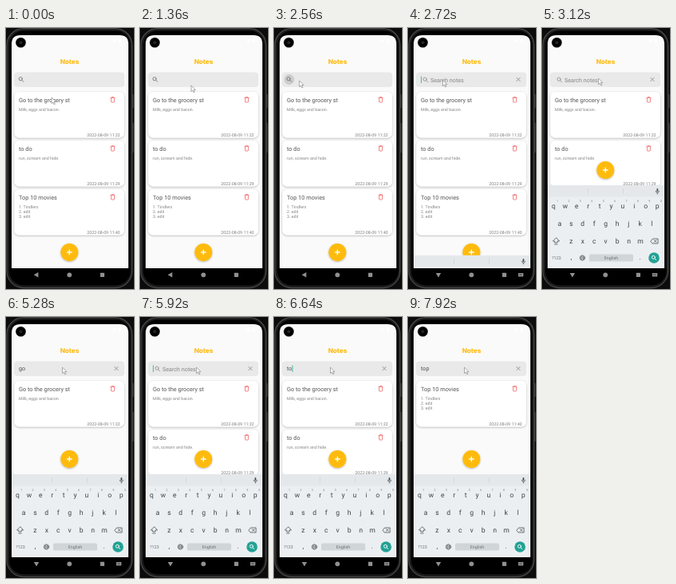
An HTML page for the animation above (8 s loop, 160x327 px).

```html
<!DOCTYPE html>
<html lang="en">
<head>
<meta charset="utf-8">
<title>Notes search</title>
<style>
html, body { margin: 0; width: 100%; height: 100%; overflow: hidden; background: #000; }
svg { display: block; width: 160px; height: 327px; }
text { font-family: Roboto, "Noto Sans", sans-serif; text-rendering: geometricPrecision; }
.brand { font: 800 8.1px Inter, sans-serif; fill: #ffbb12; text-anchor: middle; }
.title { font-size: 7.35px; fill: #555; }
.body { font-size: 5.3px; fill: #858585; }
.date { font-size: 5.3px; fill: #7c7c7c; text-anchor: end; }
.hint { font-size: 7.2px; fill: #858585; }
.query { font-size: 7.2px; fill: #505050; }
.key { font-size: 8.6px; fill: #3c4347; text-anchor: middle; }
.small { font-size: 5.4px; fill: #697176; text-anchor: middle; }
.num { font-size: 3.7px; fill: #737b80; text-anchor: middle; }
.line { fill: none; stroke-linecap: round; stroke-linejoin: round; }
</style>
</head>
<body>
<svg viewBox="0 0 160 327">
  <defs>
    <clipPath id="screen"><path d="M7 301V20Q7 9 18 9H142Q153 9 153 20V301Z"/></clipPath>
    <filter id="soft" x="-20%" y="-20%" width="140%" height="150%">
      <feDropShadow dx="0" dy=".8" stdDeviation=".9" flood-color="#000" flood-opacity=".32"/>
    </filter>
    <g id="trash" class="line" stroke="#f06464" stroke-width=".8">
      <path d="M130.9 7.3H135.9M132.5 6.5H134.3M131.4 7.6V12.4Q131.4 13 132 13H134.8Q135.4 13 135.4 12.4V7.6"/>
    </g>
    <g id="lens" class="line" stroke="#777" stroke-width=".9">
      <circle cx="-.8" cy="-.8" r="2.1"/><path d="M.8 .8L2.9 2.9"/>
    </g>
  </defs>

  <!-- phone body -->
  <rect width="160" height="327" fill="#0c0c0c"/>
  <rect x="1" y=".6" width="156.6" height="325" rx="21" fill="#1c1c1c" stroke="#4a4a4a" stroke-width="1.2"/>
  <rect x="4" y="3.4" width="151.5" height="319" rx="18"/>
  <path d="M158.6 83V100M158.6 119V156" stroke="#3a3a3a" stroke-width="1.6"/>

  <g clip-path="url(#screen)">
    <rect x="7" y="9" width="146" height="292" fill="#fafafa"/>
    <path d="M132.5 14.5H138.5L135.5 18.5ZM141 14H143.5V19H141Z" fill="#fff"/>
    <circle cx="18.5" cy="18.3" r="6.3"/>
    <circle cx="18.5" cy="18.3" r="2" fill="#20242b"/>
    <text class="brand" x="79.5" y="45.2">Notes</text>

    <rect x="10" y="55.5" width="138" height="18.5" rx="4" fill="#e9e9e9"/>
    <circle id="ripple" cx="19" cy="64.5" r="6.4" fill="#000"/>
    <use id="closedLens" href="#lens" x="19" y="64.5"/>
    <g id="hint">
      <use href="#lens" x="22" y="65" opacity=".75"/>
      <text class="hint" x="28" y="67.5">Search notes</text>
    </g>
    <text id="query" class="query" x="16" y="67.3"></text>
    <rect id="caret" y="60.5" width=".8" height="8.5" fill="#21a99b"/>
    <path id="clear" class="line" d="M135.7 62.3L140.1 66.7M140.1 62.3L135.7 66.7" stroke="#888" stroke-width=".8"/>

    <g id="cards"></g>

    <g id="fab">
      <circle r="11" fill="#ffbb08" filter="url(#soft)"/>
      <path d="M-3.3 0H3.3M0 -3.3V3.3" stroke="#fff" stroke-width="1.4"/>
    </g>

    <g id="keyboard">
      <rect x="7" y="197" width="146" height="105" fill="#eceff1"/>
      <rect x="7" y="197" width="146" height="14.5" fill="#e4e8eb"/>
      <path d="M57.5 201V208M101.5 201V208" stroke="#cbd0d3" stroke-width=".6"/>
      <g class="line" stroke="#4a5358" stroke-width=".8">
        <path d="M144.3 202V204.3" stroke-width="1.8"/>
        <path d="M142.2 204.3Q142.4 206.5 144.3 206.5T146.4 204.3M144.3 206.5V208"/>
        <path d="M17.5 263L13.6 267H15.8V269H19.2V267H21.4ZM15.8 271H19.2"/>
        <path d="M136 267L138.4 264H145V270H138.4ZM140.2 265.6L143 268.4M143 265.6L140.2 268.4"/>
        <g stroke-width=".6">
          <circle cx="50.5" cy="288" r="3.2"/>
          <ellipse cx="50.5" cy="288" rx="1.4" ry="3.2"/>
          <path d="M47.5 287H53.5M47.5 289H53.5"/>
        </g>
      </g>
      <rect x="59" y="283.5" width="55" height="9" rx="1.5" fill="#d0d5d8"/>
      <text class="small" x="86.5" y="290">English</text>
      <text class="small" x="18" y="290">?123</text>
      <text class="key" x="36.5" y="290">,</text>
      <text class="key" x="122.5" y="290">.</text>
      <circle cx="140" cy="288" r="6.8" fill="#22a295"/>
      <g class="line" stroke="#fff" stroke-width=".9">
        <circle cx="139.3" cy="287.3" r="2"/><path d="M140.8 288.8L142.7 290.7"/>
      </g>
      <g id="keys"></g>
    </g>
  </g>

  <!-- navigation bar -->
  <g fill="#909090">
    <path id="back" d="M34.7 309.3L40.4 306.1V312.5Z"/>
    <circle cx="79.3" cy="309.3" r="2.9"/>
    <rect x="117.8" y="306.7" width="5.2" height="5.2" rx=".6"/>
    <g id="switcher">
      <rect x="137.8" y="307" width="6.4" height="4.4" rx=".6"/>
      <path d="M139 308.5H143M139.5 310.1H142.5" stroke="#000" stroke-width=".6" stroke-dasharray=".7 .5"/>
    </g>
  </g>

  <path id="pointer" d="M0 0V7.6L1.8 6L3.1 8.9L4.4 8.3L3.1 5.5H5.4Z" fill="#fff" stroke="#777" stroke-width=".6"/>
</svg>

<script>
const LOOP = 8000;
const EXPAND = 2600;
const $ = id => document.getElementById(id);

const notes = [
  { title: "Go to the grocery st", lines: ["Milk, eggs and bacon."], date: "2022-08-09 11:22" },
  { title: "to do", lines: ["run, scream and hide."], date: "2022-08-09 11:29" },
  { title: "Top 10 movies", lines: ["1. Tindlers", "2. edit", "3. edit"], date: "2022-08-09 11:40" }
];

// [time, text in the search field]
const typing = [[EXPAND, ""], [4320, "g"], [4640, "go"], [5600, "g"], [5800, ""],
                [6160, "t"], [6400, "to"], [7300, "top"]];

// [time, x, y]
const path = [[0, 57, 87], [320, 57, 87], [1120, 64, 72], [1600, 64, 72], [2240, 20, 65],
              [2400, 20, 65], [2560, 31.7, 66], [3000, 70.5, 63], [LOOP, 70.5, 63]];

const label = (cls, x, y, s) => `<text class="${cls}" x="${x}" y="${y}">${s}</text>`;

$("cards").innerHTML = notes.map(n => `<g>
  <rect x="10.5" width="137.3" height="57.5" rx="6" fill="#fff" filter="url(#soft)"/>
  ${label("title", 16, 12.8, n.title)}
  ${n.lines.map((s, i) => label("body", 16, 23.8 + i * 6.1, s)).join("")}
  ${label("date", 142.6, 55.8, n.date)}
  <use href="#trash"/></g>`).join("");
const cards = [...$("cards").children];

const rows = [["qwertyuiop", 14.5, 226], ["asdfghjkl", 22, 248], ["zxcvbnm", 36.5, 270]];
$("keys").innerHTML = rows.map(([chars, x0, y], row) => [...chars].map((c, i) => {
  const x = x0 + i * 14.4;
  return label("key", x, y, c) + (row ? "" : label("num", x + 4.6, 217.5, (i + 1) % 10));
}).join("")).join("");

const clamp = v => Math.min(1, Math.max(0, v));
const ease = v => v * v * (3 - 2 * v);
const show = (id, on) => $(id).setAttribute("visibility", on ? "visible" : "hidden");
const move = (el, x, y) => el.setAttribute("transform", `translate(${x} ${y})`);

function pointerAt(t) {
  const i = path.findIndex(p => p[0] > t);
  const [t0, x0, y0] = path[i - 1], [t1, x1, y1] = path[i];
  const k = ease((t - t0) / (t1 - t0));
  return [x0 + (x1 - x0) * k, y0 + (y1 - y0) * k];
}

function render(t) {
  const open = t >= EXPAND;
  const [since, text] = typing.filter(e => e[0] <= t).pop() || [0, ""];

  show("closedLens", !open);
  show("hint", open && !text);
  show("clear", open);
  $("query").textContent = text;
  show("caret", open && (t - since) % 1000 < 500);
  $("caret").setAttribute("x", 16.3 + (text ? $("query").getComputedTextLength() : 0));

  const press = open ? 0 : clamp((t - 2360) / 120);
  $("ripple").setAttribute("opacity", press * 0.12);

  let row = 0;
  notes.forEach((n, i) => {
    const match = n.title.toLowerCase().includes(text);
    cards[i].setAttribute("display", match ? "inline" : "none");
    if (match) move(cards[i], 0, 80 + 61 * row++);
  });

  const rise = 1 - (1 - clamp((t - 2700) / 260)) ** 2;
  move($("keyboard"), 0, 104 * (1 - rise));
  move($("fab"), 79.3, t < 2800 ? 281 : 178);
  $("back").setAttribute("transform", rise ? "rotate(-90 38 309.3)" : "");
  show("switcher", rise > 0);
  move($("pointer"), ...pointerAt(t));
}

function tick() {
  render(performance.now() % LOOP);
  requestAnimationFrame(tick);
}
tick();
</script>
</body>
</html>
```
